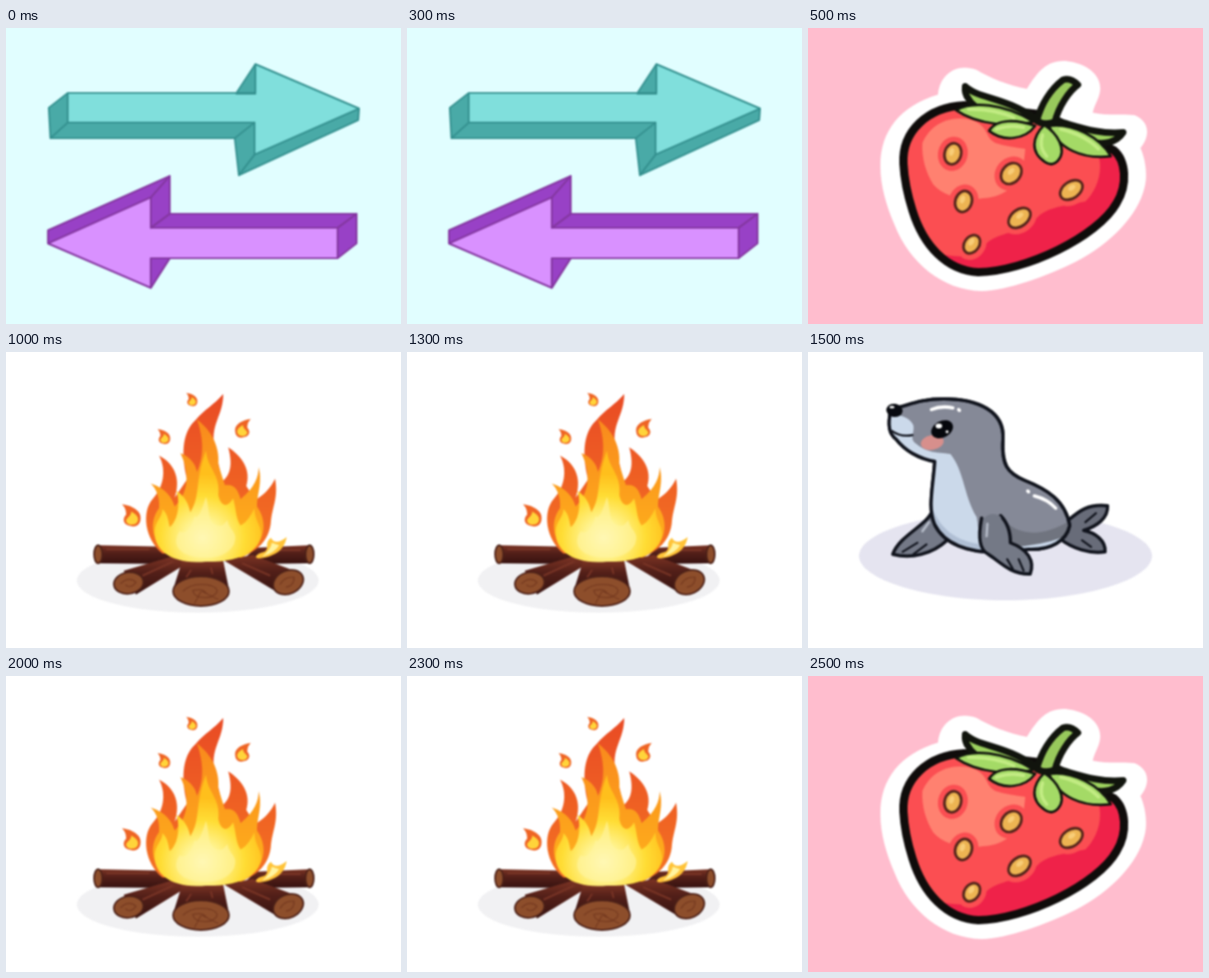
These frames come from a looping animation (480x360 px, 3 s). An HTML page:

```html
<!DOCTYPE html>
<html lang="en">
<head>
<meta charset="utf-8">
<title>Picture cards</title>
<style>
html, body { margin: 0; width: 100%; height: 100%; overflow: hidden; background: #fff; }
svg { display: block; width: 100vw; height: 100vh; }
.round { stroke-linecap: round; stroke-linejoin: round; }
.soft { filter: blur(.9px); }
</style>
</head>
<body>
<svg viewBox="0 0 480 360">
  <defs>
    <radialGradient id="glow" gradientUnits="userSpaceOnUse" cx="239" cy="226" r="78">
      <stop offset="0" stop-color="#fffbd0"/>
      <stop offset=".3" stop-color="#fff28c"/>
      <stop offset=".65" stop-color="#ffdd35"/>
      <stop offset="1" stop-color="#ffbf1c"/>
    </radialGradient>
    <linearGradient id="red" x1="0" y1="0" x2="0" y2="1">
      <stop offset="0" stop-color="#e94b25"/>
      <stop offset="1" stop-color="#f47322"/>
    </linearGradient>
    <linearGradient id="amber" x1="0" y1="0" x2="0" y2="1">
      <stop offset="0" stop-color="#f98a1d"/>
      <stop offset="1" stop-color="#ffb31c"/>
    </linearGradient>
    <linearGradient id="wood" x1="0" y1="0" x2="0" y2="1">
      <stop offset="0" stop-color="#7b3323"/>
      <stop offset=".4" stop-color="#542019"/>
      <stop offset="1" stop-color="#351210"/>
    </linearGradient>
    <g id="ember">
      <path fill="#ee6424" d="M-8-11C1-10 11-5 10 3C10 9 5 12 0 10C-7 9-8 3-4-1C-4-5-5-8-8-11Z"/>
      <path fill="#ffd43a" d="M1-4C6-1 9 2 7 6C5 10-3 10-4 5C-4 2 1 1 1-4Z"/>
    </g>
    <clipPath id="berryClip"><path id="berryBody" d="M116 165C114 125 146 96 190 94L290 106L372 149C386 161 389 190 375 213C352 254 264 296 207 297C168 295 140 264 127 222C120 200 117 184 116 165Z"/></clipPath>
    <clipPath id="sealClip"><path id="sealBody" d="M101 69C119 67 132 57 165 57C207 57 239 72 237 106C235 137 242 147 263 156C291 167 313 181 318 211C314 230 295 241 268 240L240 243C192 246 165 232 154 210C145 190 152 164 154 133C134 130 117 119 107 106C99 100 96 90 101 69Z"/></clipPath>
  </defs>

  <g id="arrows">
    <rect width="480" height="360" fill="#e1feff"/>
    <g class="round soft" stroke="#34908f" stroke-width="2.2">
      <path fill="#49aaa7" d="M52 97L75 79H280L303 44L429 98L428 112L283 179L278 134H54Z"/>
      <path fill="#80dfdc" d="M75 79H303V44L429 98L302 154V115H75Z"/>
      <path fill="none" d="M54 134L75 115M278 134L302 115M283 179L302 154M280 80H303"/>
    </g>
    <g class="round soft" stroke="#83369f" stroke-width="2.2">
      <path fill="#9841c6" d="M51 262V246L199 180V226H426V262L403 280H199L176 316Z"/>
      <path fill="#d991ff" d="M51 262L176 206V243H403V280H176V316Z"/>
      <path fill="none" d="M199 180L176 206M199 226L176 243M426 226L403 243"/>
      <path fill="#9841c6" d="M176 280H199L176 316Z"/>
    </g>
  </g>

  <g id="berry">
    <rect width="480" height="360" fill="#ffbdce"/>
    <g class="soft">
      <path fill="#fff" d="M88 169C87 127 111 95 158 81C160 56 181 42 205 51C220 60 243 70 266 74C279 53 290 39 313 40C340 43 357 58 355 76C354 86 348 93 346 103C366 107 382 104 397 106C414 113 417 130 404 146C410 159 413 179 409 194C401 228 368 262 326 284C288 303 242 319 211 320C163 319 123 285 105 239C95 216 88 191 88 169Z"/>
      <g clip-path="url(#berryClip)">
        <rect x="100" y="80" width="300" height="230" fill="#fb4e52"/>
        <path fill="#ff8170" d="M139 140C149 116 174 105 199 112C221 120 214 133 228 140C240 144 252 145 264 147C263 158 262 171 256 185C246 196 234 206 213 207C189 211 165 205 152 190C143 175 138 158 139 140Z"/>
        <path fill="#ef2249" d="M350 146C362 172 350 199 337 211C309 217 282 218 273 239C246 252 222 249 210 271C193 282 171 277 151 273L207 305L400 245V146Z"/>
        <g id="halos" fill="#fb4e52"></g>
      </g>
      <use class="round" href="#berryBody" fill="none" stroke="#0f0c0b" stroke-width="10"/>
      <g id="seeds" fill="#edb452" stroke="#53241a" stroke-width="3.2"></g>
      <g class="round" stroke="#11140d">
        <path fill="#9dd25f" stroke-width="8" d="M191 71C207 86 240 84 276 110C248 108 206 107 195 86Q190 80 191 71Z"/>
        <path fill="#9dd25f" stroke-width="8" d="M302 113C326 119 352 130 383 127C375 139 360 143 343 138Z"/>
        <path fill="#a4da66" stroke-width="3" d="M180 100C198 89 238 91 274 114C249 121 206 118 180 100Z"/>
        <path fill="#a4da66" stroke-width="3" d="M293 119C322 115 355 133 368 156C333 160 304 147 293 119Z"/>
        <path fill="#a4da66" stroke-width="3" d="M220 125C229 110 254 111 276 119C264 136 237 139 220 125Z"/>
        <path fill="#a4da66" stroke-width="3" d="M287 118C303 128 315 148 304 161Q297 169 288 163C270 151 272 133 287 118Z"/>
        <path fill="#98c95c" stroke-width="8" d="M278 113C283 94 294 75 310 63Q319 60 328 69C317 77 305 95 300 114Q288 119 278 113Z"/>
        <g fill="none" stroke="#c3ec84" stroke-width="4">
          <path d="M195 99Q225 98 250 109M229 123Q247 117 262 121M285 130Q280 145 290 156M307 123Q336 130 353 147"/>
        </g>
      </g>
    </g>
  </g>

  <g id="fire">
    <rect width="480" height="360" fill="#fff"/>
    <g class="soft">
      <ellipse cx="233" cy="278" rx="147" ry="39" fill="#f1f1f3"/>
      <g fill="url(#wood)">
        <path d="M112 235L205 237L217 258L112 257Z"/>
        <path d="M369 235L304 238L282 258L369 257Z"/>
        <path d="M143 266L201 249L228 252L158 295Z"/>
        <path d="M350 266L300 247L264 253L331 293Z"/>
        <path d="M214 254H264L271 289H203Z"/>
      </g>
      <g fill="#8d4e2b" stroke="#4c2118" stroke-width="2">
        <ellipse cx="112" cy="246" rx="5" ry="11"/>
        <ellipse cx="369" cy="246" rx="5" ry="11"/>
        <ellipse cx="149" cy="281" rx="18" ry="13" transform="rotate(-8 149 281)"/>
        <ellipse cx="343" cy="280" rx="19" ry="14" transform="rotate(-24 343 280)"/>
        <ellipse cx="237" cy="291" rx="34" ry="18"/>
      </g>
      <path fill="none" stroke="#75391f" stroke-width="1.3" d="M139 282Q149 272 158 280Q151 289 145 283M333 283Q338 273 350 274Q350 285 340 286M215 291Q227 279 249 284Q264 290 249 298Q229 301 227 290Q240 287 244 294M237 291L229 306M238 291L258 301"/>
      <path fill="none" stroke="#7a3526" stroke-width="2" d="M122 240H174M326 241H358M166 272L203 255M287 257L321 272M225 265L219 274M249 262L251 270"/>
      <path fill="url(#red)" d="M190 245C168 227 165 194 178 179C192 164 195 143 186 126C207 137 212 157 205 177L220 155C213 126 213 98 231 82C241 70 253 64 264 51C264 77 249 87 253 113L263 157C274 149 275 134 270 116C287 127 298 143 292 163L303 180C316 172 322 164 327 154C331 177 324 187 322 205C321 228 305 243 286 249Z"/>
      <path fill="url(#amber)" d="M198 247C177 232 173 207 186 190C187 177 183 167 176 160C195 166 202 178 205 188C220 173 225 151 212 123C225 128 231 138 232 146C242 124 239 102 232 82C249 95 260 114 258 137L266 162C277 160 282 167 285 179C302 165 307 152 307 140C312 159 305 172 305 188C321 210 312 239 286 250Z"/>
      <path fill="url(#glow)" d="M243 255C201 259 177 240 181 214C184 203 190 200 190 191C197 197 197 206 199 213C211 203 211 179 207 169C219 176 222 187 224 195C237 174 229 157 243 120C245 143 261 148 258 174C261 188 269 190 276 178C280 192 279 202 285 211C294 206 297 199 302 190C302 209 316 215 307 232C297 250 268 256 243 255Z"/>
      <path fill="#fff5a2" opacity=".6" d="M240 250C208 249 201 232 211 218C220 223 226 212 229 200C235 204 239 188 243 176C248 192 244 206 256 211C261 214 267 208 269 204C271 218 283 218 277 234C270 247 254 251 240 250Z"/>
      <path fill="#ffc338" d="M341 225C339 240 327 249 308 251C300 251 304 245 314 243C321 239 313 233 322 226C325 233 333 232 341 225Z"/>
      <path fill="#fff4a0" d="M332 235Q327 244 311 249Q322 240 323 232Z"/>
      <use href="#ember" transform="translate(225 58) scale(.75)"/>
      <use href="#ember" transform="translate(191 103) scale(.85)"/>
      <use href="#ember" transform="translate(289 93) scale(-1.05 1.05)"/>
      <use href="#ember" transform="translate(151 199) scale(1.25)"/>
    </g>
  </g>

  <g id="seal">
    <rect width="480" height="360" fill="#fff"/>
    <g class="soft">
      <path fill="#e5e4f0" d="M62 248C62 220 141 194 240 194S418 220 418 248S339 302 240 302S62 276 62 248Z"/>
      <g class="round" stroke="#10131c" stroke-width="4">
        <path fill="#747987" d="M151 193C145 211 111 223 103 246C125 252 151 246 169 229Z"/>
        <path fill="#686c79" d="M311 209C326 197 336 184 364 187C365 202 351 212 335 217C350 220 362 230 361 243C343 246 321 239 306 227Z"/>
        <use href="#sealBody" fill="#858997"/>
      </g>
      <g clip-path="url(#sealClip)">
        <path fill="#70747f" d="M237 203C255 224 286 226 320 204V245H230Z"/>
        <path fill="#c8d6e8" d="M250 237Q283 235 308 226L300 244H240Z"/>
        <path fill="#cbd9ea" d="M99 76C110 75 124 80 128 89C130 99 122 105 132 112C145 123 157 122 173 124C190 145 189 174 205 201L212 247L154 225L147 180L155 134L98 108Z"/>
        <path fill="#b0bfd4" d="M151 189C160 215 181 231 212 234V250L154 230Z"/>
        <ellipse cx="151" cy="110" rx="14" ry="9" fill="#d78f8c" transform="rotate(-10 151 110)"/>
      </g>
      <use class="round" href="#sealBody" fill="none" stroke="#10131c" stroke-width="4"/>
      <path class="round" fill="#747986" stroke="#10131c" stroke-width="4" d="M211 202C207 222 207 240 219 246C232 254 246 271 270 270C276 254 267 240 246 232C246 217 242 207 234 199"/>
      <path fill="#747986" d="M213 203Q223 193 234 200L239 217L212 221Z"/>
      <path class="round" fill="none" stroke="#10131c" stroke-width="2.5" d="M102 96Q113 104 127 101M115 243L133 232M128 246L144 234M249 264L242 252M262 266L256 252M337 207L350 196M344 237L333 229"/>
      <ellipse cx="105" cy="71" rx="10" ry="8" fill="#080a10" transform="rotate(10 105 71)"/>
      <ellipse cx="163" cy="94" rx="14" ry="10" fill="#05070c" transform="rotate(-28 163 94)"/>
      <g fill="#fff">
        <ellipse cx="102" cy="67" rx="3" ry="1.5"/>
        <ellipse cx="159" cy="90" rx="4" ry="3"/>
        <circle cx="169" cy="97" r="1.8"/>
      </g>
      <path class="round" fill="none" stroke="#fff" stroke-width="4" d="M150 70Q162 65 176 68M275 175Q291 179 301 190M183 70L184 71M267 169L268 170"/>
      <path class="round" fill="none" stroke="#b4bac7" stroke-width="3" d="M147 207L139 218M218 209L217 224"/>
    </g>
  </g>
</svg>
<script>
const byId = id => document.getElementById(id);

// x, y, rx, ry, tilt
const seeds = [
  [176, 153, 10, 13, 15], [247, 177, 11, 14, 42], [189, 211, 10, 13, 18],
  [320, 197, 10, 15, 55], [257, 231, 10, 15, 52], [199, 263, 9, 12, 35]
];
const oval = ([x, y, rx, ry, tilt], grow) =>
  `<ellipse cx="${x}" cy="${y}" rx="${rx + grow}" ry="${ry + grow}" transform="rotate(${tilt} ${x} ${y})"/>`;
const shine = ([x, y, , , tilt]) =>
  `<ellipse cx="${x - 2}" cy="${y - 2}" rx="3" ry="5" fill="#f8cd78" stroke="none" transform="rotate(${tilt} ${x} ${y})"/>`;
byId("halos").innerHTML = seeds.map(s => oval(s, 8)).join("");
byId("seeds").innerHTML = seeds.map(s => oval(s, 0) + shine(s)).join("");

const order = ["arrows", "berry", "fire", "seal", "fire", "berry"];
const cards = [...new Set(order)].map(byId);
const HOLD = 500;

function draw(ms) {
  const name = order[Math.floor(ms / HOLD) % order.length];
  for (const card of cards) card.style.display = card.id === name ? "" : "none";
}

const start = performance.now();
function tick() {
  draw(performance.now() - start);
  requestAnimationFrame(tick);
}
tick();
</script>
</body>
</html>
```
